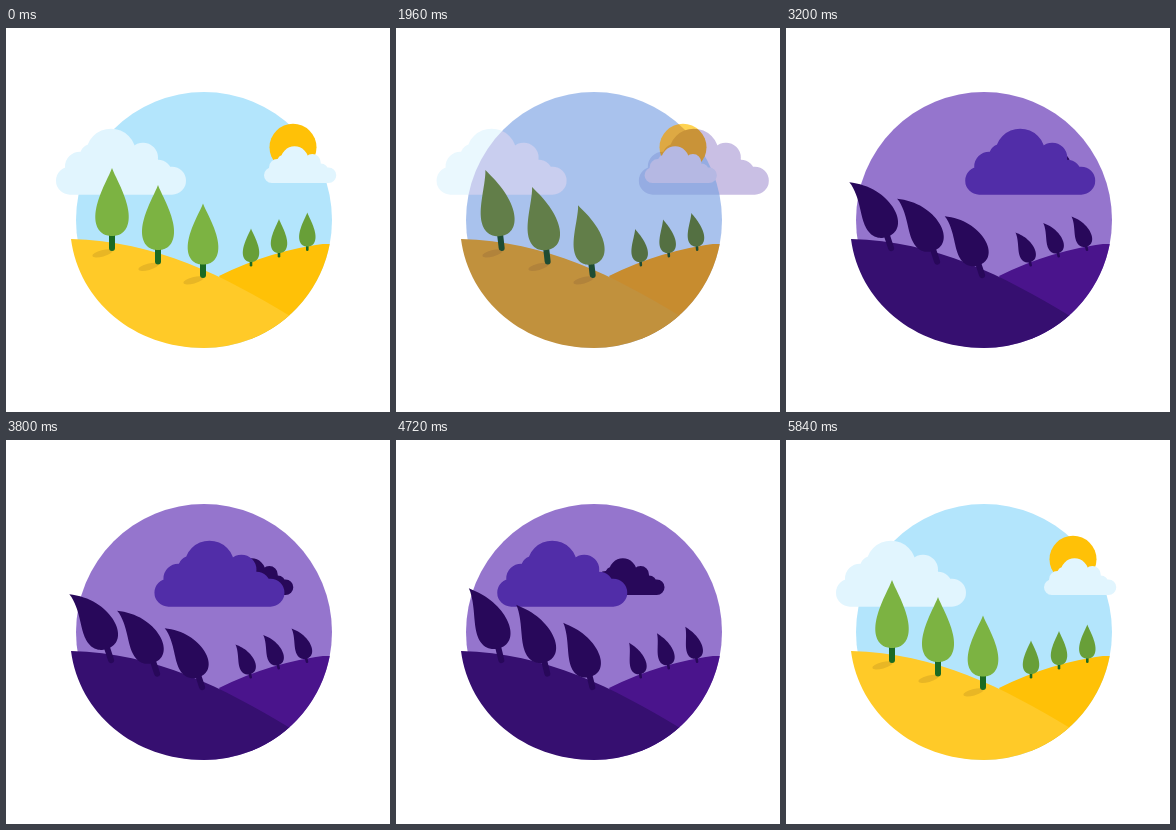
An HTML page with a canvas that plays this animation: 384 px wide and 384 px high, repeating every 5.88 s.

```html
<!DOCTYPE html>
<html lang="en">
<head>
<meta charset="utf-8">
<title>Hills in the wind</title>
<style>
html, body { margin: 0; width: 100%; height: 100%; overflow: hidden; background: #fff; }
canvas { position: absolute; left: 0; top: 0; width: 100vmin; height: 100vmin; }
</style>
</head>
<body>
<canvas id="day" width="384" height="384"></canvas>
<canvas id="night" width="384" height="384"></canvas>
<script>
const LOOP = 5880;
const DISC = { x: 198, y: 192, r: 128 };
const DAY = {
  sky: '#b3e5fc', front: '#ffca28', back: '#ffc107', cloud: '#e1f5fe', puff: '#e1f5fe',
  leaf: '#7cb342', farLeaf: '#689f38', trunk: '#1b6a22', sun: '#ffc107', shade: '#e8b625'
};
const NIGHT = {
  sky: '#9575cd', front: '#360f70', back: '#4a148c', cloud: '#512da8', puff: '#28085a',
  leaf: '#28085a', farLeaf: '#28085a', trunk: '#28085a'
};
// base x, base y, total height, trunk below the leaf, half width
const TREES = [
  [106, 223, 83, 15, 16.7], [152, 236.5, 79.5, 14.5, 16], [197, 250, 74.5, 13.5, 15.3]
];
const FAR_TREES = [
  [245, 238.5, 38, 4.5, 8.2], [273, 229.5, 38.5, 4.5, 8.2], [301.3, 223, 38.5, 4.5, 8.2]
];
// x, y, radius, measured from the cloud's lower left corner
const BUMPS = [
  [14, -14, 14], [24, -28, 15], [36, -39, 12], [55, -41, 25],
  [87, -37, 15], [102, -21, 14], [116, -14, 14]
];

const dayCanvas = document.getElementById('day');
const nightCanvas = document.getElementById('night');
const dayCtx = dayCanvas.getContext('2d');
const nightCtx = nightCanvas.getContext('2d');

const ramp = (t, a, b) => Math.min(1, Math.max(0, (t - a) / (b - a)));
const mix = (a, b, k) => a + (b - a) * k;

function circle(c, x, y, r, color) {
  c.fillStyle = color;
  c.beginPath();
  c.arc(x, y, r, 0, Math.PI * 2);
  c.fill();
}

function cloud(c, left, bottom, scale, color) {
  c.save();
  c.translate(left, bottom);
  c.scale(scale, scale);
  c.fillStyle = color;
  c.beginPath();
  for (const [x, y, r] of BUMPS) {
    c.moveTo(x + r, y);
    c.arc(x, y, r, 0, Math.PI * 2);
  }
  c.rect(14, -28, 102, 28);
  c.rect(28, -38, 64, 30);
  c.fill();
  c.restore();
}

function hills(c, p) {
  const { x, y, r } = DISC;
  c.fillStyle = p.back;
  c.beginPath();
  c.moveTo(213, 248);
  c.quadraticCurveTo(265, 222, 324, 215);
  c.arc(x, y, r, 0.18, 1.2);
  c.closePath();
  c.fill();

  c.fillStyle = p.front;
  c.beginPath();
  c.moveTo(65, 211);
  c.bezierCurveTo(150, 213, 218, 248, 284, 288);
  c.arc(x, y, r, 0.84, Math.PI / 2);
  c.bezierCurveTo(128, 320, 73, 273, 65, 211);
  c.fill();
}

// Spine of a tree from root to tip, curling more toward the tip
function spine(x, y, height, lean) {
  const n = 80, pts = [];
  for (let i = 0; i <= n; i++) {
    const u = i / n, a = lean * (0.55 + 1.35 * u * u);
    pts.push({ x, y, a });
    x -= Math.sin(a) * height / n;
    y -= Math.cos(a) * height / n;
  }
  return u => {
    const f = Math.min(n - 1e-6, Math.max(0, u * n)), i = Math.floor(f), k = f - i;
    const p = pts[i], q = pts[i + 1];
    return { x: mix(p.x, q.x, k), y: mix(p.y, q.y, k), a: mix(p.a, q.a, k) };
  };
}

function tree(c, [x, y, height, stem, half], lean, leaf, trunk, width) {
  const at = spine(x, y, height, lean);
  const top = (stem + height * 0.1) / height, foot = width / 2 / height;
  c.strokeStyle = trunk;
  c.lineWidth = width;
  c.lineCap = 'round';
  c.beginPath();
  for (let i = 0; i <= 8; i++) {
    const p = at(mix(foot, top, i / 8));
    c.lineTo(p.x, p.y);
  }
  c.stroke();

  const steps = 40, right = [], left = [];
  for (let i = 0; i <= steps; i++) {
    const q = i / steps, v = 1 - (1 - q) * (1 - q);
    const w = half * Math.pow(v, 1.15) * Math.pow(1 - v, 0.45) / 0.386;
    const p = at(mix(1, stem / height, v));
    const dx = Math.cos(p.a) * w, dy = Math.sin(p.a) * w;
    right.push([p.x + dx, p.y - dy]);
    left.unshift([p.x - dx, p.y + dy]);
  }
  c.fillStyle = leaf;
  c.beginPath();
  for (const [px, py] of right.concat(left)) c.lineTo(px, py);
  c.fill();
}

function scene(c, p, big, small, lean) {
  c.fillStyle = '#fff';
  c.fillRect(0, 0, 384, 384);
  circle(c, DISC.x, DISC.y, DISC.r, p.sky);
  if (p.sun) circle(c, 287, 119.3, 23.5, p.sun);
  cloud(c, small, 155, 0.556, p.puff);
  cloud(c, big, 166.7, 1, p.cloud);
  hills(c, p);
  if (p.shade) {
    c.fillStyle = p.shade;
    for (const [x, y] of TREES) {
      c.beginPath();
      c.ellipse(x - 9.5, y + 2.3, 10.5, 3.2, -0.27, 0, Math.PI * 2);
      c.fill();
    }
  }
  for (const t of FAR_TREES) tree(c, t, lean * 0.77, p.farLeaf, p.trunk, 2.6);
  for (const t of TREES) tree(c, t, lean, p.leaf, p.trunk, 6);
}

function draw(t) {
  const dark = ramp(t, 1840, 2240) - ramp(t, 5420, 5740);
  const calm = t < 4000 ? t : 0;
  const drift = calm * 0.0048;
  const breeze = 2.8 * Math.min(calm, 1840) / 1400;
  const gale = 28.5 + 5.2 * Math.cos((t - 275) / 600 * Math.PI * 2);
  const lean = mix(breeze, gale, dark) * Math.PI / 180;

  if (dark < 1) scene(dayCtx, DAY, 50 - drift, 258 - drift, lean);
  if (dark > 0) scene(nightCtx, NIGHT, 210 - (t - 2600) * 0.0513, 208.5 - (t - 4120) * 0.0204, lean);
  nightCanvas.style.opacity = dark;
}

let start;
function tick(now) {
  if (start === undefined) start = now;
  draw((now - start) % LOOP);
  requestAnimationFrame(tick);
}
draw(0);
requestAnimationFrame(tick);
</script>
</body>
</html>
```
